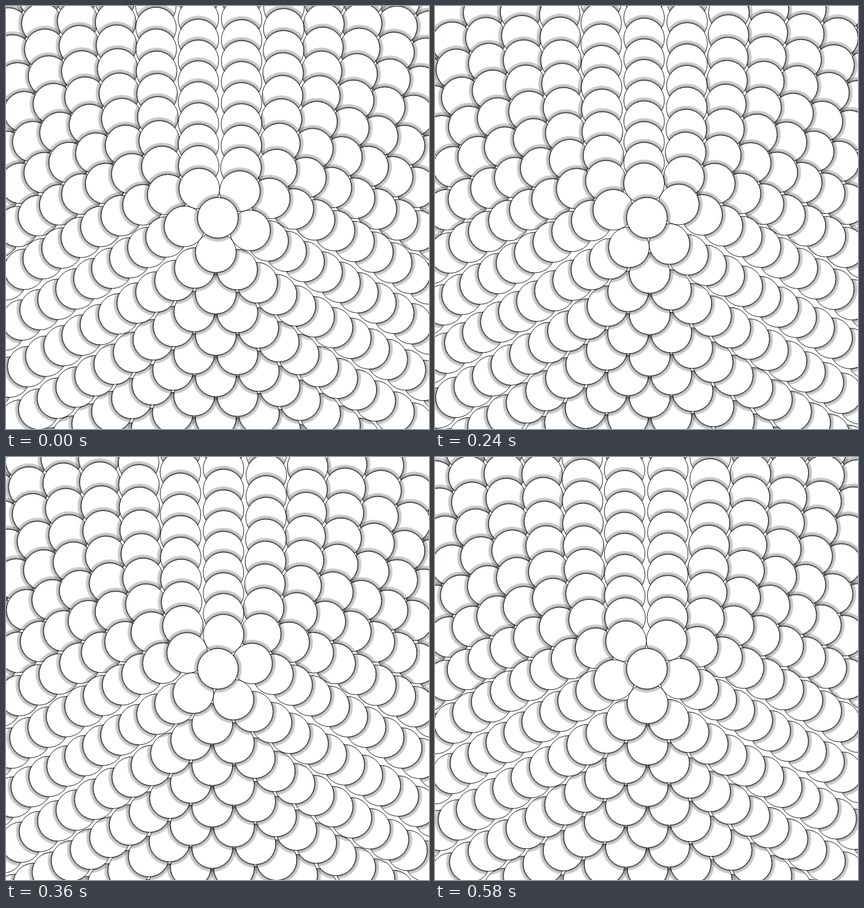
Recreate the animation shown at these times as an HTML page with a canvas. Size 720x720 px, loop 620 ms.

```html
<!DOCTYPE html>
<html lang="en">
<head>
<meta charset="utf-8">
<title>Scales</title>
<style>
html, body { margin: 0; width: 100%; height: 100%; overflow: hidden; background: #fff; }
canvas { display: block; width: 720px; height: 720px; }
</style>
</head>
<body>
<canvas id="stage" width="720" height="720"></canvas>
<script>
const SIZE = 720, CX = 360.7, CY = 360.5;
const LOOP = 620, STEP = 40, LAST = 580, ALIGNED = 280;
const RADIUS = 34.5, SHADOW = 7, RINGS = 15;
const TAU = Math.PI * 2;
// The five discs of the first ring just touch
const PITCH = RADIUS / Math.sin(Math.PI / 5) / 5;
const ctx = document.getElementById('stage').getContext('2d');

// Banded falloff around a disc: distance from the edge, darkness
const shade = ctx.createRadialGradient(0, 0, RADIUS, 0, 0, RADIUS + SHADOW);
[[0, 0.55], [1, 0.42], [2, 0.31], [2.8, 0.22], [5.6, 0.19], [6.6, 0]]
  .forEach(([d, a]) => shade.addColorStop(d / SHADOW, `rgba(0,0,0,${a})`));

function circle(p, r) {
  ctx.setTransform(1, 0, 0, 1, p.x, p.y);
  ctx.beginPath();
  ctx.arc(0, 0, r, 0, TAU);
}

function drawRing(points) {
  // Shadows fall only on discs already laid down, never on the background
  ctx.globalCompositeOperation = 'source-atop';
  ctx.fillStyle = shade;
  for (const p of points) {
    circle(p, RADIUS + SHADOW);
    ctx.fill();
  }
  ctx.globalCompositeOperation = 'source-over';
  ctx.fillStyle = '#fff';
  ctx.strokeStyle = '#000';
  ctx.lineWidth = 0.9;
  for (const p of points) {
    circle(p, RADIUS);
    ctx.fill();
    ctx.stroke();
  }
}

// Every ring turns by one disc per loop
function ringPoints(k, phase) {
  const n = 3 * k + 2, rho = PITCH * n, points = [];
  const reach = SIZE / 2 + RADIUS + SHADOW;
  for (let i = 0; i < n; i++) {
    const a = (i + phase) / n * TAU;
    const dx = rho * Math.sin(a), dy = -rho * Math.cos(a);
    if (Math.abs(dx) < reach && Math.abs(dy) < reach) {
      points.push({ x: CX + dx, y: CY + dy });
    }
  }
  return points;
}

function draw(t) {
  ctx.setTransform(1, 0, 0, 1, 0, 0);
  ctx.clearRect(0, 0, SIZE, SIZE);
  const phase = (t - ALIGNED) / LOOP;
  for (let k = RINGS; k > 0; k--) drawRing(ringPoints(k, phase));
  drawRing([{ x: CX, y: CY }]);
}

const start = performance.now();
let shown = -1;

function tick() {
  const t = (performance.now() - start) % LOOP;
  const step = t >= LAST ? LAST : Math.floor(t / STEP) * STEP;
  if (step !== shown) {
    shown = step;
    draw(step);
  }
  requestAnimationFrame(tick);
}
tick();
</script>
</body>
</html>
```
